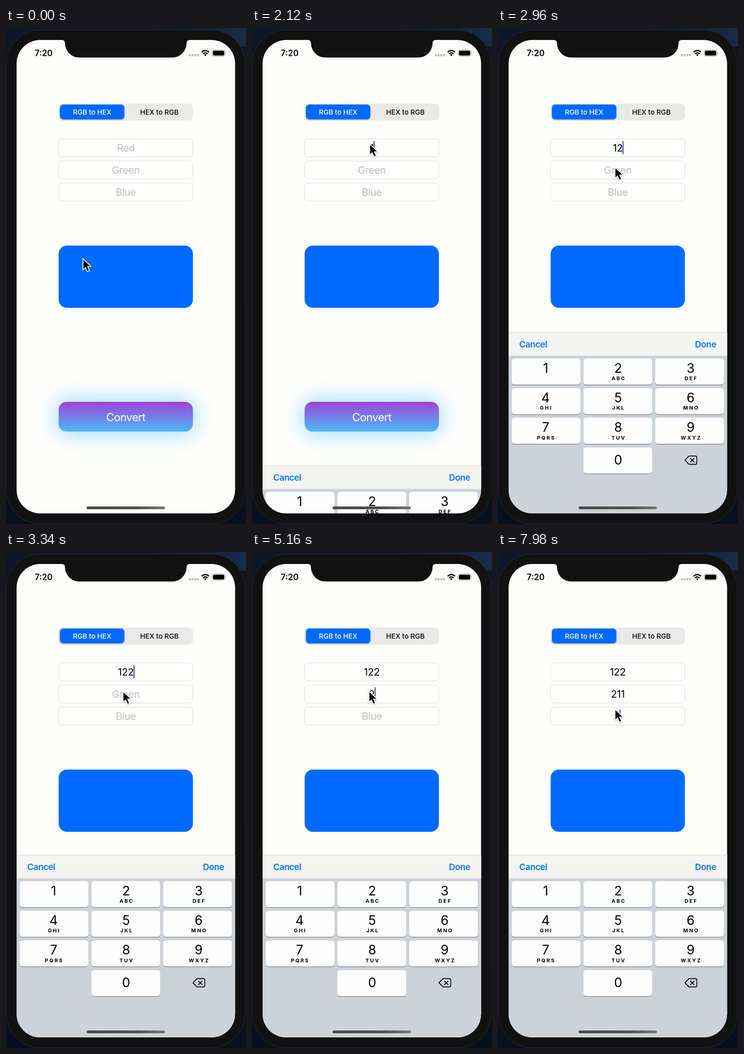
Recreate the animation shown at these times as an HTML page. Size 521 by 1076 pixels, loop 8 s.

```html
<!DOCTYPE html>
<html lang="en">
<head>
<meta charset="utf-8">
<title>Colour converter</title>
<style>
  html, body { margin: 0; width: 100%; height: 100%; overflow: hidden; background: #070c16; }
  svg { display: block; width: 521px; height: 1076px; font-family: Inter, "Open Sans", sans-serif; }
  .mid { text-anchor: middle; }
  .segment { font-size: 15px; font-weight: 500; }
  .field { font-size: 22px; letter-spacing: -.5px; }
  .bar { font-size: 19px; font-weight: 600; letter-spacing: -.5px; fill: #087af3; }
  .digit { font-size: 28px; }
  .letters { font-size: 11px; font-weight: 700; letter-spacing: 2.6px; }
</style>
</head>
<body>
<svg viewBox="0 0 521 1076">
  <defs>
    <linearGradient id="desk" x2="0" y2="1">
      <stop stop-color="#0d1728"/><stop offset=".2" stop-color="#0b1321"/><stop offset="1" stop-color="#07101c"/>
    </linearGradient>
    <linearGradient id="sky">
      <stop offset=".6" stop-color="#182c49" stop-opacity="0"/><stop offset="1" stop-color="#182c49"/>
    </linearGradient>
    <linearGradient id="purple" x2="0" y2="1">
      <stop stop-color="#a043d9"/><stop offset="1" stop-color="#4bbaf6"/>
    </linearGradient>
    <linearGradient id="homeBar">
      <stop stop-color="#494949"/><stop offset=".65" stop-color="#505050"/><stop offset="1" stop-color="#777"/>
    </linearGradient>
    <filter id="glow" x="-50%" y="-200%" width="200%" height="500%"><feGaussianBlur stdDeviation="24"/></filter>
    <filter id="soft" x="-50%" y="-50%" width="200%" height="200%">
      <feDropShadow dx="0" dy="1.5" stdDeviation="1.5" flood-opacity=".25"/>
    </filter>
    <clipPath id="screen"><rect x="23" y="26" width="474.3" height="1027" rx="51"/></clipPath>
  </defs>

  <rect width="521" height="1076" fill="url(#desk)"/>
  <rect width="521" height="40" fill="url(#sky)"/>
  <rect x="1" y="4.5" width="518" height="1071" rx="73" fill="#111" stroke="#282b31"/>

  <g clip-path="url(#screen)">
    <rect x="23" y="26" width="475" height="1027" fill="#fdfdfc"/>

    <rect x="114.3" y="164" width="291.5" height="36.5" rx="9" fill="#e9e9ea"/>
    <rect x="117" y="166" width="140" height="32.3" rx="7.5" fill="#006aff" filter="url(#soft)"/>
    <text class="mid segment" x="187" y="187.5" fill="#fff">RGB to HEX</text>
    <text class="mid segment" x="333" y="187.5">HEX to RGB</text>

    <g id="fields"></g>
    <rect id="caret" width="2.4" height="29" rx="1" fill="#3b55cf"/>

    <rect x="114.3" y="472" width="291.5" height="135" rx="18" fill="#006aff"/>

    <rect x="114" y="811" width="292" height="65" rx="18" fill="#4cc0ff" opacity=".66" filter="url(#glow)"/>
    <rect x="114.3" y="811" width="291.5" height="64.5" rx="17" fill="url(#purple)"/>
    <text class="mid" x="260" y="852.5" font-size="24" letter-spacing="-.7" fill="#fff">Convert</text>

    <g id="keyboard">
      <rect x="23" width="475" height="440" fill="#cdd2d8"/>
      <rect x="23" width="475" height="51" fill="#f4f4f3"/>
      <rect x="23" width="475" height="1" fill="#d2d3d2"/>
      <text class="bar" x="46" y="33">Cancel</text>
      <text class="bar" x="473.7" y="33" text-anchor="end">Done</text>
      <g id="keys"></g>
      <g fill="none" stroke="#111" stroke-width="1.9" stroke-linecap="round" stroke-linejoin="round">
        <path d="M414.5 268.5H428.5Q431.5 268.5 431.5 271.5V283.5Q431.5 286.5 428.5 286.5H414.5L406 277.5Z"/>
        <path d="M418 274l7.5 7.5M425.5 274l-7.5 7.5"/>
      </g>
    </g>
    <rect x="175" y="1038" width="170" height="6" rx="3" fill="url(#homeBar)"/>
  </g>

  <path d="M121 25V26Q128 26 128 33A31 31 0 0 0 159 64H361A31 31 0 0 0 392 33Q392 26 399 26V25Z" fill="#111"/>

  <text x="62.5" y="61" font-size="18" font-weight="600">7:20</text>
  <path d="M397 59H419" stroke="#bdbdbd" stroke-width="4.5" stroke-dasharray="4.4 1.5"/>
  <g fill="none" stroke="#000" stroke-width="2.8">
    <path d="M424.8 52.6Q432.7 45.2 440.6 52.6M427.8 56.2Q432.7 51.6 437.6 56.2"/>
    <path d="M430 58.2Q432.7 56 435.4 58.2L432.7 61.2Z" fill="#000" stroke="none"/>
  </g>
  <rect x="447.5" y="47.5" width="28" height="14" rx="4" fill="none" stroke="#999"/>
  <rect x="449.3" y="49.3" width="24.4" height="10.4" rx="2.4"/>
  <path d="M477 52.3q2 2.2 0 4.4z" fill="#999"/>

  <path id="pointer" d="M0 0V24.2L5.4 19.2L9.3 28.2L14.2 26.1L10.4 17.2H18Z" stroke="#fff" stroke-width="1.8" filter="url(#soft)"/>
</svg>

<script>
const LOOP = 8000;
const REST = 657, HIDDEN = 1053;
const $ = id => document.getElementById(id);

function add(parent, tag, attrs, text = "") {
  const el = document.createElementNS("http://www.w3.org/2000/svg", tag);
  for (const name in attrs) el.setAttribute(name, attrs[name]);
  el.textContent = text;
  parent.append(el);
  return el;
}

// Each field gains one character of its value at each typing time.
const fields = [
  { hint: "Red", value: "122", focus: 1900, typed: [2080, 2760, 3120] },
  { hint: "Green", value: "211", focus: 4400, typed: [4880, 5200, 5420] },
  { hint: "Blue", value: "1", focus: 7200, typed: [7760] }
];
fields.forEach((field, i) => {
  field.y = 240.5 + i * 48.2;
  add($("fields"), "rect", {
    x: 114.5, y: field.y, width: 291, height: 38.6, rx: 6, fill: "#fefefd", stroke: "#d9d9da"
  });
  field.label = add($("fields"), "text", { class: "mid field", x: 260, y: field.y + 27.5 });
});

// Key captions are spread slightly wider than the keys themselves.
["", "ABC", "DEF", "GHI", "JKL", "MNO", "PQRS", "TUV", "WXYZ", null, ""].forEach((letters, i) => {
  if (letters === null) return;
  const column = i % 3, digit = (i + 1) % 11;
  const x = 29.5 + column * 155.8, y = 57 + Math.floor(i / 3) * 64.3;
  const mid = 103.4 + column * 157.4;
  add($("keys"), "rect", { x, y: y + 1.5, width: 149.5, height: 56.5, rx: 6, fill: "#898d94" });
  add($("keys"), "rect", { x, y, width: 149.5, height: 56.5, rx: 6, fill: "#fdfdfd" });
  add($("keys"), "text", { class: "mid digit", x: mid, y: y + (digit ? 30.5 : 37.5) }, digit);
  add($("keys"), "text", { class: "mid letters", x: mid + 1.3, y: y + 47 }, letters);
});

// Pointer moves: start, end, x, y
const moves = [
  [500, 1650, 255.5, 251.5],
  [2180, 2500, 254, 298.5],
  [2560, 2760, 254, 302],
  [5500, 6000, 254, 341]
];

const ease = p => p * p * (3 - 2 * p);
const clamp = p => Math.min(1, Math.max(0, p));

function pointerAt(t) {
  let x = 167, y = 500.5;
  for (const [start, end, toX, toY] of moves) {
    const p = ease(clamp((t - start) / (end - start)));
    x += (toX - x) * p;
    y += (toY - y) * p;
  }
  return [x, y];
}

// Critically damped spring
function keyboardY(t) {
  const s = Math.max(0, t - 1979) * .007;
  return Math.round(REST + (HIDDEN - REST) * (1 + s) * Math.exp(-s));
}

function draw(t) {
  let active = null;
  for (const field of fields) {
    const text = field.value.slice(0, field.typed.filter(time => t >= time).length);
    const shown = text || field.hint;
    if (field.label.textContent !== shown) field.label.textContent = shown;
    field.label.setAttribute("fill", text ? "#000" : "#bebebf");
    if (t >= field.focus) active = { field, text };
  }

  $("caret").setAttribute("visibility", active ? "visible" : "hidden");
  if (active) {
    const half = active.text ? active.field.label.getComputedTextLength() / 2 : 0;
    $("caret").setAttribute("x", 259.5 + half);
    $("caret").setAttribute("y", active.field.y + 4.5);
  }

  $("keyboard").setAttribute("transform", `translate(0 ${keyboardY(t)})`);
  $("pointer").setAttribute("transform", `translate(${pointerAt(t)})`);
}

const began = performance.now();
function tick() {
  draw((performance.now() - began) % LOOP);
  requestAnimationFrame(tick);
}
tick();
</script>
</body>
</html>
```
